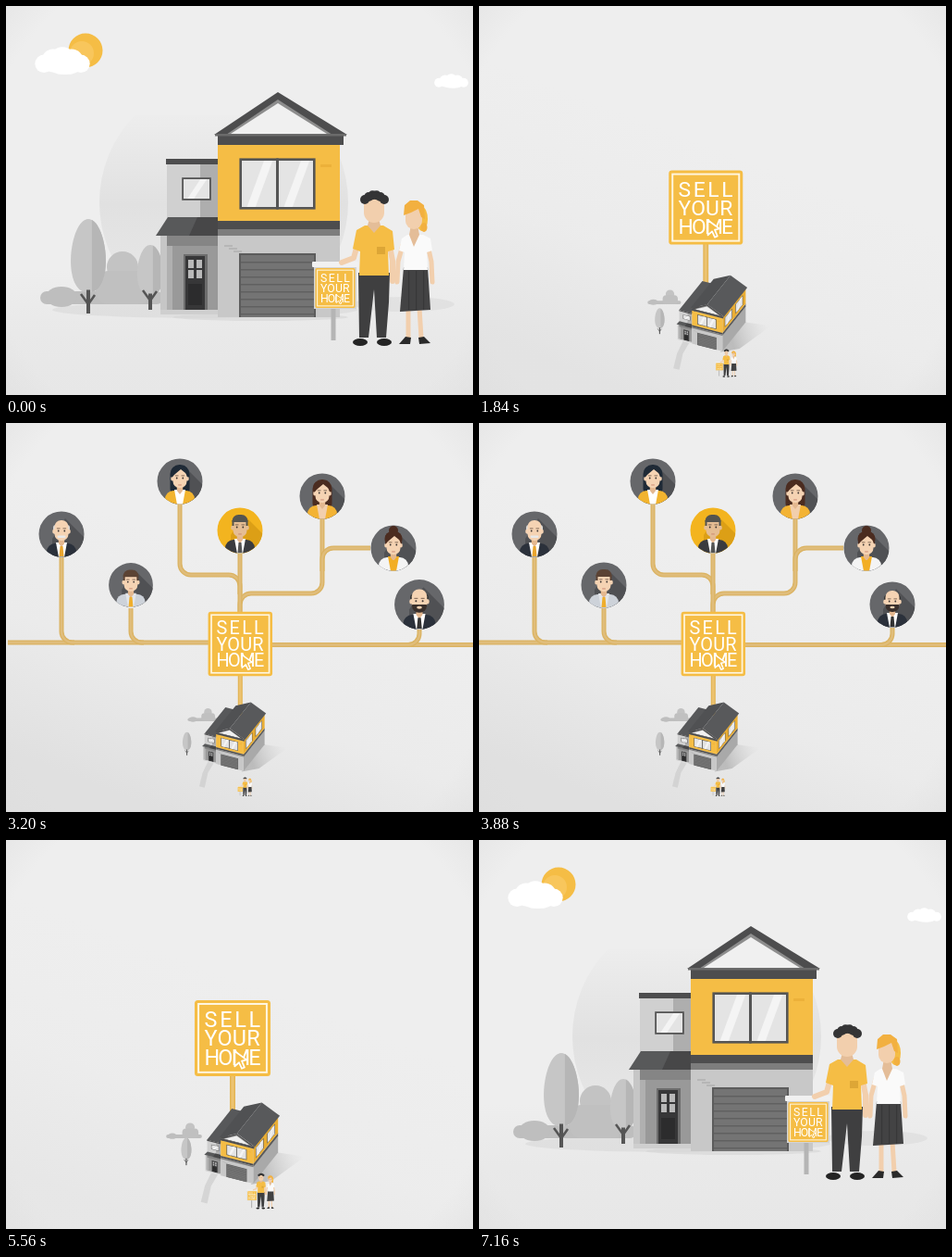
An HTML page with a canvas for the animation above (7.2 s loop, 505 by 420 pixels).

```html
<!DOCTYPE html>
<html lang="en">
<head>
<meta charset="utf-8">
<title>Sell your home</title>
<style>
html, body { margin: 0; width: 100%; height: 100%; overflow: hidden; background: #eee; }
canvas { display: block; width: 505px; height: 420px; }
</style>
</head>
<body>
<canvas id="stage" width="505" height="420"></canvas>
<script>
const c = document.getElementById('stage').getContext('2d');
const W = 505, H = 420, LOOP = 7200, MIRROR = 7360;
const YELLOW = '#f5bd45', DARK = '#4d4d4e', SKIN = '#f2cfad';

// ---- timing -------------------------------------------------------------
// Monotone cubic through (ts, vs), flat at both ends.
function curve(ts, vs, t) {
  const n = ts.length - 1;
  if (t <= ts[0]) return vs[0];
  if (t >= ts[n]) return vs[n];
  const sec = k => (vs[k + 1] - vs[k]) / (ts[k + 1] - ts[k]);
  const tan = k => {
    if (k < 1 || k >= n) return 0;
    const a = sec(k - 1), b = sec(k);
    return a * b <= 0 ? 0 : 2 * a * b / (a + b);
  };
  let i = 0;
  while (t > ts[i + 1]) i++;
  const h = ts[i + 1] - ts[i], u = (t - ts[i]) / h, v = u * u * (3 - 2 * u);
  return vs[i] * (1 - v) + vs[i + 1] * v
    + h * (u * (1 - u) * (1 - u) * tan(i) + u * u * (u - 1) * tan(i + 1));
}
const smooth = x => { x = Math.max(0, Math.min(1, x)); return x * x * (3 - 2 * x); };

// One flight drives the whole camera: u is the logarithm of the zoom.
const STOPS = [0, .2, .47, .973, 1.139];
const OUT = [600, 940, 1080, 1720, 2150], BACK = [6860, 6400, 6190, 5560, 5000];
let m, u, zoom, tilt;
function setTime(t) {
  m = Math.min(t, MIRROR - t);
  u = t < 3600 ? curve(OUT, STOPS, t) : curve([...BACK].reverse(), [...STOPS].reverse(), t);
  zoom = Math.exp(-u);
  tilt = smooth((u - .3) / .67);
}

// Street coordinates around (295, 336): x right, y up, z away.
function project(x, y, z) {
  const a = axes();
  return [a.ox + x * a.xx + z * a.zx, a.oy + x * a.xy - y * a.yy + z * a.zy];
}
function axes() {
  const yaw = .79 * tilt, lift = Math.sin(tilt);
  return {
    ox: 295 - 46.5 * u, oy: 336 + 31.5 * u,
    xx: zoom * Math.cos(yaw), xy: .3 * zoom * Math.sin(yaw) * lift,
    yy: zoom * Math.cos(tilt),
    zx: zoom * Math.sin(yaw), zy: -1.5 * zoom * Math.cos(yaw) * lift
  };
}

// ---- drawing helpers ----------------------------------------------------
function rect(col, x, y, w, h) { c.fillStyle = col; c.fillRect(x, y, w, h); }
function poly(col, pts) {
  c.fillStyle = col;
  c.beginPath();
  pts.forEach(p => c.lineTo(p[0], p[1]));
  c.closePath();
  c.fill();
}
function oval(col, x, y, rx, ry = rx) {
  c.fillStyle = col;
  c.beginPath();
  c.ellipse(x, y, rx, ry, 0, 0, 7);
  c.fill();
}
function round(col, x, y, w, h, r) {
  c.fillStyle = col;
  c.beginPath();
  c.roundRect(x, y, w, h, r);
  c.fill();
}
function stroke(col, width, pts) {
  c.strokeStyle = col;
  c.lineWidth = width;
  c.beginPath();
  pts.forEach(p => c.lineTo(p[0], p[1]));
  c.stroke();
}
function fade(x0, y0, x1, y1, ...cols) {
  const g = c.createLinearGradient(x0, y0, x1, y1);
  cols.forEach((col, i) => g.addColorStop(i / (cols.length - 1), col));
  return g;
}
function layer(draw) { c.save(); draw(); c.restore(); }
// Place a drawing so that its origin lands on (x, y).
function place(x, y, s, draw) {
  layer(() => {
    c.translate(x, y);
    c.scale(s, s);
    draw();
  });
}

// ---- backdrop -----------------------------------------------------------
function backdrop() {
  rect('#eeeeee', 0, 0, W, H);
  layer(() => {
    c.globalAlpha = 1 - tilt;
    rect(fade(0, 285, 0, H, 'rgba(232,232,232,0)', '#e9e9e9', '#e7e7e7'), 0, 285, W, 135);
    const top = 118 + 163 * u;
    c.beginPath();
    c.rect(0, top, W, 310 - top);
    c.clip();
    oval(fade(0, top, 0, 310, '#ededed', '#e1e1e1', '#e8e8e8'), 235.5, 212, 134.5);
  });
  layer(() => {
    c.globalAlpha = tilt * smooth((u - .8) / .34);
    rect(fade(300, 170, 200, 430, '#eeeeee', '#ebebeb', '#e0e0e0'), 0, 0, W, H);
  });
  const v = c.createRadialGradient(252, 210, 285, 252, 210, 335);
  v.addColorStop(0, 'rgba(220,220,220,0)');
  v.addColorStop(1, 'rgba(220,220,220,.45)');
  rect(v, 0, 0, W, H);
}

// A row of n puffs, tallest in the middle.
function cloud(x, y, w, h, n) {
  for (let i = 0; i < n; i++) {
    const k = (i + .5) / n, r = h * (.3 + .2 * Math.sin(Math.PI * k));
    oval('#fff', x + h * .3 + (w - h * .6) * i / (n - 1), y + h * (.2 - .25 * Math.sin(Math.PI * k)), r);
  }
  oval('#fff', x + w * .55, y + h * .28, w * .3, h * .28);
}
function sky() {
  place(86 + 135 * u, 48 - 105 * u, 1 - .57 * u, () => {
    oval(YELLOW, 0, 0, 18.5);
    oval('#f8c65c', -4, 3, 13);
    cloud(-53, 11, 56, 27, 5);
  });
  place(482 - 70 * u, 80 - 125 * u, 1 - .45 * u, () => cloud(-18, 1, 35, 14, 5));
}

// ---- garden -------------------------------------------------------------
const plantScale = () => zoom * (1 - .23 * tilt);

function shrubs() {
  place(37 + 140 * u, 322, plantScale(), () => {
    round('#bebebe', 0, -14, 133, 14, 7);
    oval('#bebebe', 23, -8, 17, 11);
    oval('#c3c3c3', 89, -40, 17);
    round('#c0c0c0', 60, -36, 60, 36, 14);
  });
}
// Egg-shaped crown, base at the origin.
function egg(col, w, h) {
  const low = -h * .22, top = -h;
  c.fillStyle = col;
  c.beginPath();
  c.moveTo(0, top);
  c.bezierCurveTo(w * .42, top, w * .62, low, 0, low);
  c.bezierCurveTo(-w * .62, low, -w * .42, top, 0, top);
  c.fill();
}
function tree(x, z, lift, w, h) {
  const [px, py] = project(x, 0, z);
  place(px, py - lift * zoom, plantScale(), () => {
    layer(() => {
      c.scale(1.12, 1);
      egg('#c6c6c6', w, h);
      c.beginPath();
      c.rect(w * .08, -h, w, h);
      c.clip();
      egg('#b6b6b6', w, h);
    });
    rect('#555', -2, -h * .25, 4, h * .25);
    stroke('#555', 2.5, [[-8, -21], [0, -10], [7, -20]]);
  });
}

// ---- house --------------------------------------------------------------
const quad = (col, ...pts) => poly(col, pts.map(p => project(...p)));

function house() {
  const a = axes();
  const front = draw => layer(() => {
    c.transform(a.xx, a.xy, 0, a.yy, a.ox, a.oy);
    c.translate(-295, -336);
    draw();
  });
  if (tilt > .01) {
    const [sx, sy] = project(66, 0, 40), [ex, ey] = project(165, 0, 105);
    quad(fade(sx, sy, ex, ey, 'rgba(165,165,165,.65)', 'rgba(205,205,205,0)'),
      [60, 0, -4], [66, 0, 100], [168, 0, 108], [120, 0, 20]);
    quad('rgba(200,200,200,.6)', [-105, 0, 0], [-78, 0, 0], [-70, 0, -35], [-36, 0, -84], [-62, 0, -84], [-92, 0, -38]);
  }
  quad('#57585a', [-122, 170, 0], [-122, 170, 100], [-60, 170, 100], [-60, 170, 0]);
  layer(() => {
    c.transform(a.zx, a.zy, 0, a.yy, ...project(66, 0, 0));
    sideWall();
  });
  front(() => { annex(); mainFront(); });
  quad('#505153', [-73, 197, 0], [0, 243, 0], [0, 243, 100], [-73, 197, 100]);
  quad('#58595b', [73, 197, 0], [0, 243, 0], [0, 243, 100], [73, 197, 100]);
  front(gable);
}
function pane(x, y, w, h, rim) {
  rect('#555', x - rim, y - rim, w + 2 * rim, h + 2 * rim);
  rect('#e4e4e4', x, y, w, h);
  poly('#f4f4f4', [[x + w * .15, y + h], [x + w * .65, y], [x + w * .9, y], [x + w * .4, y + h]]);
}
function sideWall() {
  rect('#a9a9a9', 0, -90, 100, 90);
  rect('#5a5a5a', 0, -104, 100, 16);
  rect('#e9ad33', 0, -197, 100, 93);
  [12, 58].forEach(z => pane(z, -170, 28, 48, 2));
}
function annex() {
  rect('#d0d0d0', 174, 166, 55, 64);
  rect('#aeaeae', 210, 171, 19, 58);
  rect(DARK, 173, 165, 56, 6);
  pane(192, 187, 28, 21, 1.8);
  rect('#c6c6c6', 167, 247, 62, 81);
  rect('#999', 174, 247, 55, 81);
  rect('#858585', 174, 248, 55, 11);
  rect('#b0b0b0', 174, 259, 6, 69);
  poly('#58595a', [[175, 228], [229, 228], [229, 248], [162, 248]]);
  poly('#474748', [[207, 228], [229, 228], [229, 248], [198, 248]]);
  rect('#6d6d6d', 192, 268, 26, 60);
  rect('#373738', 194, 270, 21, 58);
  for (let i = 0; i < 4; i++) rect('#b9b9b9', 197 + i % 2 * 9, 274 + (i >> 1) * 11, 6, 9);
  rect('#2c2c2d', 197, 300, 15, 23);
  rect('#cfcfcf', 167, 328, 62, 5);
}
function mainFront() {
  rect('#c8c8c8', 229, 240, 132, 96);
  rect(YELLOW, 229, 149, 132, 84);
  rect(DARK, 229, 232, 132, 9);
  rect('#7d7d7d', 229, 241, 132, 7);
  for (let i = 0; i < 3; i++) rect('#b6b6b6', 236 + i * 5, 258 + i * 3, 9, 2);
  rect('#ecb13a', 340, 171, 12, 3);
  [255, 295].forEach(x => pane(x, 167, 37, 50, 2.6));
  rect('#5c5c5c', 252, 267, 83, 69);
  rect('#747474', 254, 269, 79, 67);
  for (let y = 276; y < 336; y += 8) rect('#606060', 254, y, 79, 1.5);
}
function gable() {
  poly(DARK, [[225, 139], [294, 93], [369, 139]]);
  poly('#8d8d8d', [[238, 139], [294, 101], [353, 139]]);
  poly('#f0f0f0', [[243, 138], [294, 105], [347, 138]]);
  rect(DARK, 229, 139, 136, 11);
  rect('#6b6b6b', 226, 138, 142, 2.5);
}

// ---- sign ---------------------------------------------------------------
function board(x, y, size) {
  place(x, y, size / 70, () => {
    round(YELLOW, -35, -35, 70, 70, 3);
    c.strokeStyle = '#fff6e0';
    c.lineWidth = 1.7;
    c.strokeRect(-31.5, -31.5, 63, 63);
    c.fillStyle = '#fff';
    c.font = '400 20px Roboto, sans-serif';
    [['SELL', 2.3], ['YOUR', .2], ['HOME', -1.6]].forEach(([word, gap], i) => {
      c.letterSpacing = gap + 'px';
      c.fillText(word, -26, -10.5 + 17.7 * i);
    });
    const arrow = [[2, 12], [13, 20], [8.5, 21], [11, 27], [8.5, 28], [6, 22.5], [2, 26], [2, 12]];
    poly(YELLOW, arrow);
    c.lineJoin = 'round';
    stroke('#fff', 1.5, arrow);
  });
}
function bigSign() {
  const ts = [1460, 1660, 1800, 2200];
  const size = curve(ts, [0, 96, 82, 69.5], m);
  if (size < 1) return;
  const x = 245 + 8.3 * smooth((m - 1800) / 400), y = curve(ts, [300, 193, 214, 238.5], m);
  const w = size * .073;
  rect('#e3b557', x - w / 2, y, w, Math.max(0, 316 - y));
  rect('#ecc371', x - w / 4, y, w / 2, Math.max(0, 316 - y));
  board(x, y, size);
}

// ---- network ------------------------------------------------------------
// In order of appearance; each portrait sits at the end of its own wire.
const NAVY = '#2b313b', BROWN = '#4b2c20';
const PEOPLE = [
  { path: [[253, 185], [253, 164], [188, 164], [188, 88]], hair: '#1f2a36', style: 'long', coat: '#f2b42f', shirt: '#fff' },
  { path: [[253, 205], [253, 184], [342, 184], [342, 104]], hair: BROWN, style: 'long', coat: '#f3b334', shirt: SKIN },
  { path: [[253, 204], [253, 141]], bg: '#f3b41f', hair: '#55544f', style: 'short', skin: '#e5bd93', coat: '#3a3b3f', shirt: '#fff', tie: '#555' },
  { path: [[74, 237], [60, 237], [60, 145]], hair: '#d9d9d9', style: 'bald', tache: '#e9e9e9', coat: NAVY, shirt: '#fff', tie: '#e9a52e' },
  { path: [[342, 160], [342, 135], [394, 135]], hair: BROWN, style: 'bob', coat: '#f4f4f4', shirt: '#f2ae25', tie: '#f2ae25' },
  { path: [[149, 237], [135, 237], [135, 200]], hair: '#5b4334', style: 'short', coat: '#cdd2d9', shirt: '#e3e6ea', tie: '#efae2c' },
  { path: [[433, 239.5], [447, 239.5], [447, 221]], hair: '#333', style: 'bald', beard: '#3a302c', coat: NAVY, shirt: '#fff', tie: '#333' }
];
function wire(pts, part) {
  let len = 0;
  for (let i = 1; i < pts.length; i++) len += Math.hypot(pts[i][0] - pts[i - 1][0], pts[i][1] - pts[i - 1][1]);
  c.setLineDash([len * part, 2000]);
  [['#dbb362', 5], ['#e0bd7b', 2.4]].forEach(([col, w]) => {
    c.strokeStyle = col;
    c.lineWidth = w;
    c.beginPath();
    c.moveTo(...pts[0]);
    for (let i = 1; i < pts.length - 1; i++) c.arcTo(...pts[i], ...pts[i + 1], 12);
    c.lineTo(...pts[pts.length - 1]);
    c.stroke();
  });
  c.setLineDash([]);
}
function network() {
  if (m <= 1900) return;
  const ts = [1900, 2280, 2640, 3040, 3350];
  wire([[253, 237], [curve(ts, [230, 57, 39, 12, -3], m), 237]], 1);
  wire([[253, 239.5], [curve(ts, [276, 433, 472, 500, 508], m), 239.5]], 1);
  PEOPLE.forEach((p, i) => {
    const part = smooth((m - 2280 - 10 * i * i) / 500);
    if (part > 0) wire(p.path, part);
  });
}

// ---- portraits ----------------------------------------------------------
function portrait(p, i) {
  const start = 2540 + 100 * Math.max(0, i - 2);
  const s = curve([0, 100, 210, 330, 450], [0, .75, 1.18, .97, 1], m - start);
  if (s < .02) return;
  const [[ax, ay], [bx, by]] = p.path.slice(-2);
  place(bx + 25 * Math.sign(bx - ax), by + 25 * Math.sign(by - ay), s, () => bust(p));
}
function bust(p) {
  const skin = p.skin || '#f5d3b3';
  c.beginPath();
  c.arc(0, 0, 24.5, 0, 7);
  c.clip();
  rect(p.bg || '#66676a', -25, -25, 50, 50);
  poly(p.bg ? '#dc9f16' : '#505154', [[4, -17], [25, 4], [25, 25], [-10, 25], [-10, 5]]);
  if (p.style === 'long') round(p.hair, -10.5, -18, 21, 30, [10, 10, 4, 4]);
  if (p.style === 'bob') { oval(p.hair, 0, -19, 5); round(p.hair, -9.5, -18, 19, 17, 8); }
  round(p.coat, -16, 10, 32, 20, [9, 9, 0, 0]);
  poly(p.shirt, [[-6, 9], [6, 9], [3, 25], [-3, 25]]);
  poly('#e4b890', [[-3.2, 4], [3.2, 4], [3.2, 10], [0, 14], [-3.2, 10]]);
  if (p.tie) poly(p.tie, [[-1.5, 13], [1.5, 13], [2.5, 24], [-2.5, 24]]);
  if (p.style === 'bald') round(p.hair, -9, -10, 18, 10, 3);
  round(skin, -7.5, -15, 15, 22, 7);
  [-8, 8].forEach(x => oval(skin, x, -3, 1.8, 2.5));
  if (p.style === 'short') {
    round(p.hair, -8.5, -17, 17, 8, [7, 7, 1, 1]);
    [-8.5, 6.5].forEach(x => rect(p.hair, x, -11, 2, 6));
  }
  if (p.style === 'long' || p.style === 'bob')
    poly(p.hair, [[-9, -4], [-9, -13], [-4, -17], [5, -17], [9, -12], [9, -4], [6, -9], [1, -13], [-5, -8]]);
  if (p.beard) {
    round(p.beard, -7.5, 0, 15, 8, [1, 1, 7, 7]);
    oval(skin, 0, 3, 2.6, 1.3);
  }
  if (p.tache) round(p.tache, -4.5, 1.5, 9, 2.4, 1.2);
  [-3.3, 3.3].forEach(x => {
    oval('#3b3330', x, -3.5, .9);
    rect('#6a5344', x - 1.8, -6.5, 3.6, .8);
  });
  if (!p.tache && !p.beard) rect('#c9836c', -1.8, 3.5, 3.6, .9);
}

// ---- couple -------------------------------------------------------------
function couple() {
  const s = curve(STOPS, [1, .716, .53, .231, .122], u);
  place(239 + 158 * s, 408 - 41 * s, s, () => {
    c.translate(-397, -367);
    smallSign();
    man();
    woman();
  });
}
function smallSign() {
  rect('#b5b5b5', 351.5, 320, 5, 41);
  rect('#d4d4d4', 333, 280, 46, 47);
  round('#f1f1f1', 331, 276, 50, 6, 1);
  board(356, 304.5, 43);
}
function limb(w, ...pts) {
  c.lineCap = c.lineJoin = 'round';
  stroke(SKIN, w, pts);
  c.lineCap = 'butt';
}
// Eyes are shut while the camera rests at street level.
function eyes(x, y) {
  layer(() => {
    c.globalAlpha = smooth(u * 8);
    [-4.5, 4.5].forEach(d => oval('#5a4a42', x + d, y, 1.2));
  });
}
function man() {
  [383, 409].forEach(x => oval('#242424', x, 363, 8, 4));
  poly('#3f3f40', [[381, 288], [415, 288], [414, 320], [411, 358], [401, 358], [398, 306], [392, 358], [382, 358]]);
  limb(6, [381, 254], [376, 272], [363, 277]);
  limb(6, [414, 254], [418, 275], [418, 297]);
  poly(YELLOW, [[388, 237], [408, 237], [418, 243], [420, 263], [413, 265], [414, 291], [382, 291], [383, 265], [375, 262], [379, 242]]);
  rect('#dda636', 401, 260, 9, 8);
  poly('#e4bd98', [[394, 226], [402, 226], [405, 237], [398, 245], [391, 237]]);
  round(SKIN, 387, 207, 22, 27, [6, 6, 11, 11]);
  for (let i = 0; i < 6; i++) oval('#343435', 388 + i * 4.2, 209 - 5 * Math.sin(i * Math.PI / 5), 5);
  eyes(398, 220);
}
function woman() {
  oval(YELLOW, 450, 230, 6, 13);
  limb(5, [435, 326], [435, 358]);
  limb(5, [447, 326], [449, 358]);
  poly('#2a2a2a', [[432, 357], [438, 358], [437, 365], [425, 365]]);
  poly('#2a2a2a', [[446, 358], [452, 357], [459, 364], [447, 365]]);
  limb(5, [429, 258], [424, 276], [423, 298]);
  limb(5, [456, 258], [460, 276], [461, 298]);
  poly('#434344', [[430, 282], [456, 282], [459, 328], [426, 330]]);
  for (let x = 435; x < 455; x += 8) rect('#373738', x, 286, 1.2, 42);
  poly('#fafafa', [[434, 247], [451, 247], [459, 251], [461, 264], [455, 266], [456, 285], [430, 285], [431, 266], [425, 264], [428, 251]]);
  poly('#e4bd98', [[438, 236], [445, 236], [447, 247], [441, 260], [436, 247]]);
  round(SKIN, 432, 216, 18, 25, [6, 6, 9, 9]);
  poly('#f2b040', [[430, 226], [431, 215], [437, 210], [445, 210], [452, 215], [453, 230], [449, 228], [446, 219], [438, 223]]);
  oval('#f2b040', 452, 239, 3.5, 5);
  eyes(440, 228);
}

function groundShade() {
  layer(() => {
    c.globalAlpha = 1 - tilt;
    place(...project(0, 0, 0), zoom, () => {
      oval('rgba(214,214,214,.5)', -80, -8, 165, 9);
      oval('rgba(214,214,214,.6)', -20, 0, 95, 4);
      oval('rgba(214,214,214,.45)', 135, -14, 55, 8);
    });
  });
}

function frame(time) {
  setTime(time % LOOP);
  backdrop();
  sky();
  groundShade();
  shrubs();
  network();
  bigSign();
  tree(-139, 40, 8, 32, 70);
  tree(-206, 0, 4, 43, 102);
  house();
  PEOPLE.forEach(portrait);
  couple();
}
const begin = performance.now();
function tick() {
  frame(performance.now() - begin);
  requestAnimationFrame(tick);
}
tick();
</script>
</body>
</html>
```
